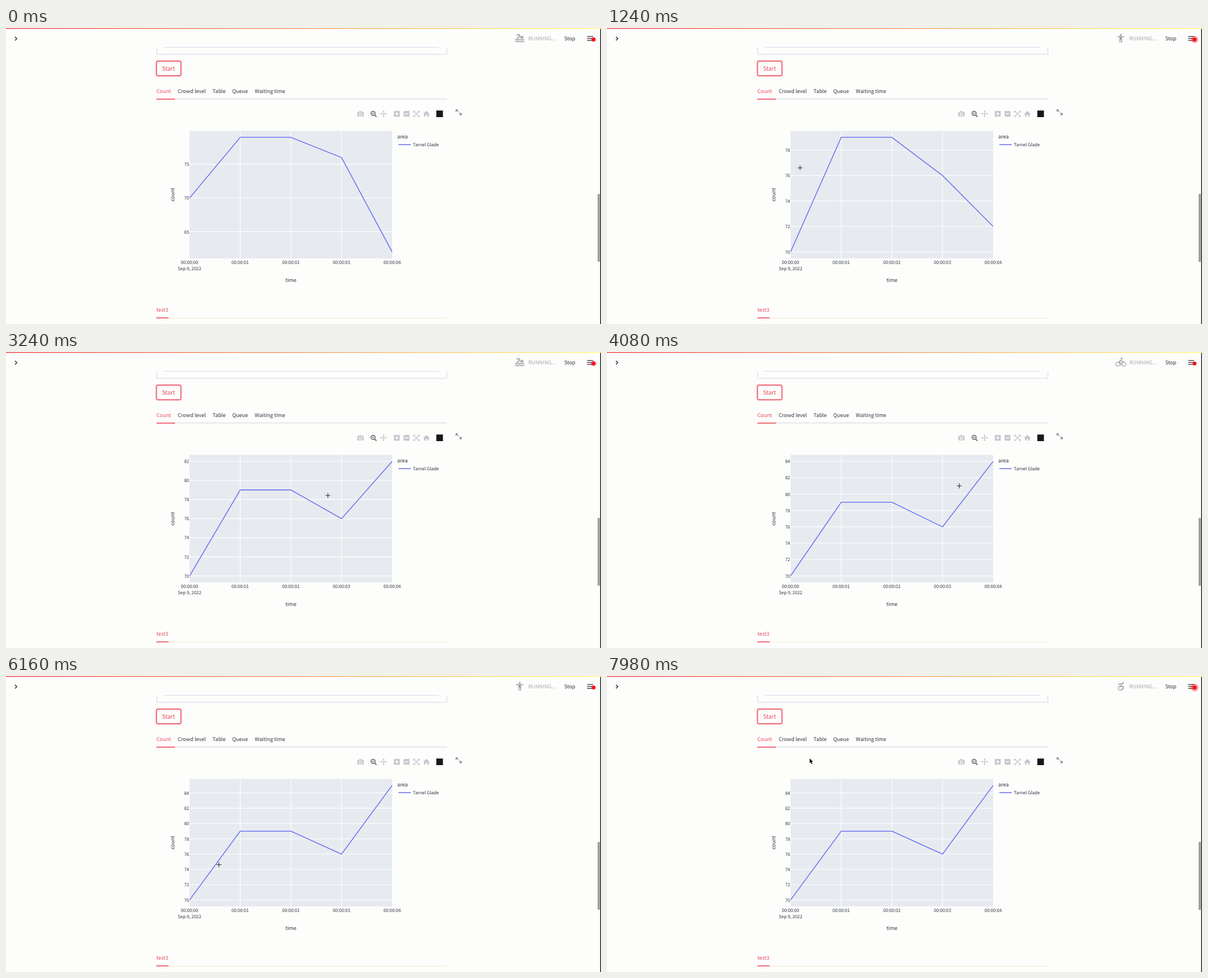
Recreate the animation shown at these times as an HTML page with a canvas. Size 1060 px wide and 528 px high, loop 8000 ms.

```html
<!DOCTYPE html>
<html lang="en">
<head>
<meta charset="utf-8">
<title>Live count dashboard</title>
<style>
html, body { margin: 0; width: 100%; height: 100%; overflow: hidden; background: #fdfdfc; }
canvas { display: block; width: 1060px; height: 528px; }
</style>
</head>
<body>
<canvas id="stage"></canvas>
<script>
const LOOP = 8000, W = 1060, H = 528;
const FONT = '"Noto Sans CJK JP", "Noto Sans CJK SC", "Noto Sans CJK", "Open Sans", sans-serif';
const INK = '#31333f', RED = '#ea4858', MUTED = '#a3a3a8', BLUE = '#6f74f2';
const PAGE = '#fdfdfc', TOOL = '#c6c6d0';
const PLOT = { left: 327, right: 688, top: 183.5, bottom: 411, high: 195, low: 399.5 };

// [start in ms, latest count]
const UPDATES = [[0, 62], [620, 72], [1900, 74], [2900, 82], [3700, 84], [4500, 85]];
// [time in ms, x, y]
const POINTER = [
  [0, 230, 560], [820, 286, 545], [1240, 344, 249.5], [1760, 298, 416], [2360, 367.5, 335.5],
  [3240, 573.5, 256], [4200, 630, 238], [5180, 646.5, 229], [5740, 345, 361],
  [6760, 437.5, 295], [7500, 372, 180], [7980, 361, 147]
];
const ICON_CYCLE = 350;
const ICONS = [[0.4, drawSwimmer], [0.65, drawPerson], [0.78, drawBike], [1, drawWheelchair]];
const PULSE = 1070, PULSE_LOW = 5180;

const canvas = document.getElementById('stage');
const ctx = canvas.getContext('2d');
const ratio = window.devicePixelRatio || 1;
canvas.width = W * ratio;
canvas.height = H * ratio;

function text(str, x, y, size, color = INK, align = 'left') {
  ctx.font = `${size}px ${FONT}`;
  ctx.textAlign = align;
  ctx.fillStyle = color;
  ctx.fillText(str, x, y);
}

function rect(x, y, w, h, color) {
  ctx.fillStyle = color;
  ctx.fillRect(x, y, w, h);
}

function trace(points) {
  ctx.beginPath();
  points.forEach(([x, y], i) => i ? ctx.lineTo(x, y) : ctx.moveTo(x, y));
}

function line(points, color, width = 1) {
  trace(points);
  ctx.strokeStyle = color;
  ctx.lineWidth = width;
  ctx.stroke();
}

function shape(points, color) {
  trace(points);
  ctx.fillStyle = color;
  ctx.fill();
}

function disc(x, y, r, color) {
  ctx.beginPath();
  ctx.arc(x, y, r, 0, Math.PI * 2);
  ctx.fillStyle = color;
  ctx.fill();
}

function ring(x, y, r, color, width = 1, from = 0, to = Math.PI * 2) {
  ctx.beginPath();
  ctx.arc(x, y, r, from, to);
  ctx.strokeStyle = color;
  ctx.lineWidth = width;
  ctx.stroke();
}

function roundBox(x, y, w, h, r, color, width) {
  ctx.beginPath();
  ctx.roundRect(x, y, w, h, r);
  ctx.strokeStyle = color;
  ctx.lineWidth = width;
  ctx.stroke();
}

function drawSwimmer() {
  disc(920, 16.2, 2, MUTED);
  line([[909.5, 12.5], [914, 12], [918.5, 18.5]], MUTED, 1.9);
  line([[914.5, 15], [910.5, 18.8]], MUTED, 1.9);
  for (const y of [20.5, 24]) {
    ctx.beginPath();
    for (let x = 907; x <= 923.5; x += 0.5) ctx.lineTo(x, y + 0.9 * Math.cos((x - 907) * 1.15));
    ctx.lineWidth = 1.5;
    ctx.strokeStyle = MUTED;
    ctx.stroke();
  }
}

function drawPerson() {
  disc(915.3, 12.2, 1.8, MUTED);
  line([[909, 15.5], [921.6, 15.5]], MUTED, 1.7);
  rect(913, 15, 4.6, 6, MUTED);
  line([[913.8, 20], [913.8, 26]], MUTED, 1.6);
  line([[916.8, 20], [916.8, 26]], MUTED, 1.6);
}

function drawBike() {
  ring(910, 21.8, 3.4, MUTED, 1.2);
  ring(920.8, 21.8, 3.4, MUTED, 1.2);
  disc(917, 11.8, 1.7, MUTED);
  line([[915.6, 24], [915.6, 20.2], [912.4, 17.6], [915.3, 14.6], [917.6, 17], [921, 17]], MUTED, 1.7);
}

function drawWheelchair() {
  disc(919.2, 12.6, 1.7, MUTED);
  line([[911, 15.5], [914, 13.3], [917.3, 15], [914.8, 18.8], [920, 19], [919.3, 24]], MUTED, 1.7);
  ring(914.6, 21.7, 3.7, MUTED, 1.5, 0.1, Math.PI * 1.55);
}

function drawHeader(t) {
  const bar = ctx.createLinearGradient(0, 0, W, 0);
  bar.addColorStop(0, '#f04a50');
  bar.addColorStop(1, '#fffd80');
  rect(0, 0, W, 1.5, bar);
  line([[16, 15.8], [19.2, 19], [16, 22.2]], '#22232b', 1.4);

  const phase = t % ICON_CYCLE / ICON_CYCLE;
  ICONS.find(([end]) => phase < end)[1]();
  text('RUNNING...', 930.5, 22.3, 9.18, '#a5a6ac');
  text('Stop', 994.5, 22.3, 9.18);

  for (const y of [15.2, 18.7, 22.2]) line([[1035.3, y], [1046, y]], INK, 1.3);
  const glow = (1 - Math.cos((t - PULSE_LOW) / PULSE * Math.PI * 2)) / 2;
  const r = 4 + 5 * glow;
  const halo = ctx.createRadialGradient(1046.8, 20.5, 2.5, 1046.8, 20.5, r);
  halo.addColorStop(0, 'rgba(255,20,30,0.75)');
  halo.addColorStop(1, 'rgba(255,20,30,0)');
  disc(1046.8, 20.5, r, halo);
  disc(1046.8, 20.5, 3.3, '#f5101c');
}

function drawPage() {
  rect(0, 0, W, H, PAGE);
  line([[281, 34.5], [771, 34.5]], '#d9d9ec');
  line([[268.5, 35], [268.5, 47], [785.5, 47], [785.5, 35]], '#d5d5e6');

  roundBox(267.3, 58.3, 45.2, 27.6, 3.5, '#f9c3c6', 2.6);
  roundBox(268.4, 59.4, 43, 25.4, 2.5, RED, 1.2);
  text('Start', 289.6, 76.2, 10.4, RED, 'center');

  const tabs = [['Count', 268], ['Crowd level', 306], ['Table', 368], ['Queue', 403], ['Waiting time', 443.3]];
  tabs.forEach(([name, x], i) => text(name, x, 115.6, 9.18, i ? INK : RED));
  ctx.setLineDash([1.5, 1]);
  line([[301, 126.5], [785, 126.5]], '#b9b9cc');
  ctx.setLineDash([]);
  rect(268, 126, 33, 1.6, RED);

  text('test3', 268, 505.8, 9.18, RED);
  rect(290, 517, 495, 1, '#f0efc8');
  rect(268, 516.4, 21.6, 1.6, RED);

  rect(1054, 296, 4, 121, '#a0a0a0');
  rect(1058.6, 0, 1.4, H, '#16161a');
}

function drawToolbar() {
  const active = '#77777c';
  // camera
  rect(625.8, 149.8, 11.4, 7.8, TOOL);
  rect(629, 148.3, 5, 2, TOOL);
  ring(631.5, 153.6, 2.3, PAGE, 1.1);
  // zoom
  ring(654, 152.3, 3.7, active, 1.8);
  line([[656.8, 155.2], [660, 158.4]], active, 2.1);
  line([[652.2, 152.3], [655.8, 152.3]], active);
  line([[654, 150.5], [654, 154.1]], active);
  // pan
  line([[667.5, 153], [678, 153]], TOOL, 1.2);
  line([[672.7, 147.8], [672.7, 158.2]], TOOL, 1.2);
  for (let i = 0; i < 4; i++) {
    ctx.save();
    ctx.translate(672.7, 153);
    ctx.rotate(i * Math.PI / 2);
    shape([[6, 0], [3.6, -2.2], [3.6, 2.2]], TOOL);
    ctx.restore();
  }
  // zoom in and out
  rect(691, 148, 10.4, 10.2, TOOL);
  rect(708.4, 148, 10.4, 10.2, TOOL);
  line([[693.2, 153.1], [699.2, 153.1]], PAGE, 1.6);
  line([[696.2, 150.1], [696.2, 156.1]], PAGE, 1.6);
  line([[710.6, 153.1], [716.6, 153.1]], PAGE, 1.6);
  // autoscale
  line([[727, 149], [735.5, 157.5]], TOOL, 1.3);
  line([[735.5, 149], [727, 157.5]], TOOL, 1.3);
  for (const sx of [-1, 1]) for (const sy of [-1, 1]) {
    const x = 731.2 + sx * 5.2, y = 153.2 + sy * 5;
    line([[x - sx * 3, y], [x, y], [x, y - sy * 3]], TOOL, 1.2);
  }
  // home
  shape([[742.8, 153.4], [749, 147.8], [755, 153.4], [753.4, 153.4], [753.4, 158], [750.4, 158],
    [750.4, 155], [747.6, 155], [747.6, 158], [744.6, 158], [744.6, 153.4]], TOOL);
  rect(766.6, 147.2, 11.8, 11.8, '#17171c');
  // fullscreen
  const corner = '#85868c';
  line([[803, 147], [810, 153.6]], corner, 1.3);
  rect(805.4, 149.4, 2.2, 2, PAGE);
  shape([[801, 145.2], [805.6, 145.2], [801, 149.8]], corner);
  shape([[811.8, 155.4], [807.2, 155.4], [811.8, 150.8]], corner);
}

function drawChart(last) {
  const { left, right, top, bottom, high, low } = PLOT;
  const counts = [70, 79, 79, 76, last];
  const min = Math.min(...counts), max = Math.max(...counts);
  const toX = i => left + i * (right - left) / 4;
  const toY = v => low - (v - min) / (max - min) * (low - high);
  const step = max - min > 15 ? 5 : 2;

  rect(left, top, right - left, bottom - top, '#e7ebf0');
  for (let i = 0; i < 5; i++) {
    const x = toX(i);
    if (i % 4) line([[x, top], [x, bottom]], '#fff', 1.1);
    text('00:00:0' + i, x, 420.8, 7.95, INK, 'center');
  }
  for (let v = Math.ceil(min / step) * step; v <= max; v += step) {
    const y = toY(v);
    line([[left, y], [right, y]], '#fff', 1.1);
    text(String(v), left - 0.8, y + 3.1, 7.95, INK, 'right');
  }
  text('Sep 9, 2022', left, 432.4, 7.95, INK, 'center');
  text('time', 507.6, 453.3, 9.18, INK, 'center');
  ctx.save();
  ctx.translate(300, 297.3);
  ctx.rotate(-Math.PI / 2);
  text('count', 0, 0, 9.18, INK, 'center');
  ctx.restore();

  ctx.save();
  ctx.beginPath();
  ctx.rect(left, top, right - left, bottom - top);
  ctx.clip();
  line(counts.map((v, i) => [toX(i), toY(v)]), BLUE, 1.6);
  ctx.restore();

  text('area', 697, 197, 9.18);
  line([[699, 208], [721, 208]], BLUE, 1.6);
  text('Tarnel Glade', 724.8, 211.2, 7.95);
}

function pointerAt(t) {
  const next = POINTER.findIndex(p => p[0] > t);
  if (next < 0) return POINTER[POINTER.length - 1].slice(1);
  const [t0, x0, y0] = POINTER[next - 1], [t1, x1, y1] = POINTER[next];
  const k = (t - t0) / (t1 - t0), e = k * k * (3 - 2 * k);
  return [x0 + (x1 - x0) * e, y0 + (y1 - y0) * e];
}

function drawPointer(t) {
  const [x, y] = pointerAt(t);
  const inside = x > PLOT.left && x < PLOT.right && y > PLOT.top && y < PLOT.bottom;
  if (inside) {
    line([[x - 4.5, y], [x + 4.5, y]], '#222');
    line([[x, y - 4.5], [x, y + 4.5]], '#222');
    return;
  }
  const arrow = [[0, 0], [0, 8.6], [2, 6.8], [3.5, 10.2], [5, 9.5], [3.6, 6.3], [6.2, 6.1], [0, 0]];
  const points = arrow.map(([dx, dy]) => [x + dx, y + dy]);
  line(points, '#fff', 1.4);
  shape(points, '#111');
}

function draw(t) {
  ctx.setTransform(ratio, 0, 0, ratio, 0, 0);
  ctx.textRendering = 'geometricPrecision';
  drawPage();
  drawHeader(t);
  drawToolbar();
  drawChart(UPDATES.filter(([start]) => start <= t).pop()[1]);
  drawPointer(t);
}

const start = performance.now();
function tick() {
  draw((performance.now() - start) % LOOP);
  requestAnimationFrame(tick);
}
tick();
</script>
</body>
</html>
```
